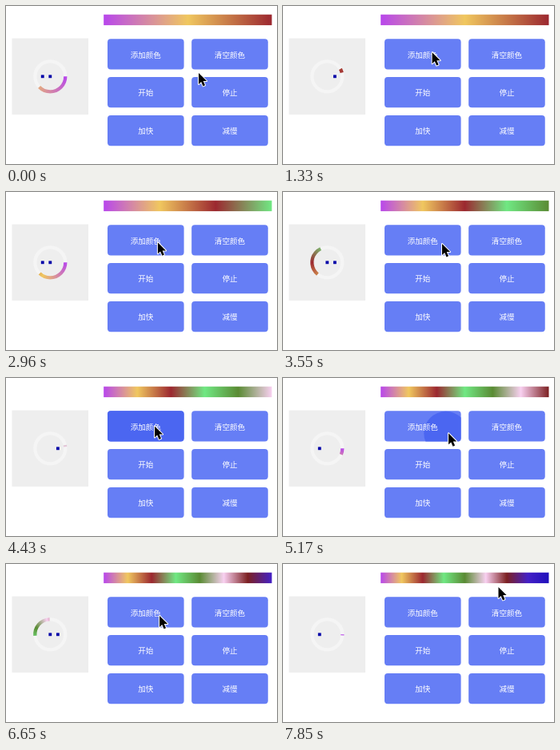
Animation, 339 px wide and 198 px high, one loop 8000 ms. Source, as an HTML page with a canvas:

```html
<!DOCTYPE html>
<html lang="zh">
<head>
<meta charset="utf-8">
<title>颜色加载器</title>
<style>
  html, body { margin: 0; width: 100%; height: 100%; overflow: hidden; background: #fff; }
  canvas { display: block; width: 339px; height: 198px; }
</style>
</head>
<body>
<canvas id="stage"></canvas>
<script>
const W = 339, H = 198, LOOP = 8000;
const STEP = 148.1, LAST_STEP = 53;
const SPIN = 2975, SPIN_OFFSET = 1255;
const UNIT = 0.478; // layout pixels to stage pixels
const PANEL = { x: 7.5, y: 40.5, size: 200 * UNIT };
const CENTER = { x: PANEL.x + PANEL.size / 2, y: PANEL.y + PANEL.size / 2 };
const RING = { r: 19, width: 4.3 };
const DOT = { size: 8 * UNIT, gap: 20 * UNIT };
const BAR = { x: 122.2, y: 10.7, w: 440 * UNIT, h: 28 * UNIT };
const BUTTON = { x: 127, y: 41.3, w: 200 * UNIT, h: 80 * UNIT, margin: 20 * UNIT, r: 4 };
const RIPPLE = { speed: 0.205, life: 400, fade: 50 };
const CLICK = { first: 2200, gap: 950, count: 6 };

const COLORS = ['#b847ec', '#f0c75f', '#9c2830', '#70e883', '#5a8b34',
                '#f8d0f0', '#7c2022', '#4420c6', '#2010bc'];
const LABELS = ['添加颜色', '清空颜色', '开始', '停止', '加快', '减慢'];

// Turning points of the pointer: time, x, y
const TURNS = [
  [0, 241, 84], [1150, 187, 58], [2360, 180.5, 61.5],
  [3550, 199, 65], [4430, 186, 60.5], [5610, 216, 73],
  [6650, 192, 65], [7500, 250, 6], [7850, 269.5, 29]
];
const ARROW = new Path2D('M0 0v14l3.2-2.9 2.3 5.3 2.5-1.1-2.3-5.2h4.4z');

const canvas = document.getElementById('stage');
const scale = window.devicePixelRatio || 1;
canvas.width = W * scale;
canvas.height = H * scale;
const ctx = canvas.getContext('2d');

function pointerAt(t) {
  const next = TURNS.findIndex(turn => turn[0] > t);
  if (next < 0) return TURNS[TURNS.length - 1].slice(1);
  const [t0, x0, y0] = TURNS[next - 1];
  const [t1, x1, y1] = TURNS[next];
  const p = (t - t0) / (t1 - t0);
  const e = p * p * (3 - 2 * p);
  return [x0 + (x1 - x0) * e, y0 + (y1 - y0) * e];
}

function clicksBy(t) {
  const n = Math.floor((t - CLICK.first) / CLICK.gap) + 1;
  return Math.max(0, Math.min(CLICK.count, n));
}

function addStops(gradient, colors) {
  colors.forEach((c, i) => gradient.addColorStop(i / (colors.length - 1), c));
  return gradient;
}

function drawBar(colors) {
  ctx.fillStyle = addStops(ctx.createLinearGradient(BAR.x, 0, BAR.x + BAR.w, 0), colors);
  ctx.fillRect(BAR.x, BAR.y, BAR.w, BAR.h);
}

function strokeArc(from, to, style) {
  ctx.beginPath();
  ctx.arc(CENTER.x, CENTER.y, RING.r, from, to);
  ctx.strokeStyle = style;
  ctx.lineWidth = RING.width;
  ctx.stroke();
}

function drawLoader(t, colors) {
  ctx.fillStyle = '#eee';
  ctx.fillRect(PANEL.x, PANEL.y, PANEL.size, PANEL.size);
  strokeArc(0, Math.PI * 2, '#f5f5f5');

  // The tail starts halfway and catches the head at a full turn
  const phase = (t + SPIN_OFFSET) % SPIN / SPIN;
  const head = Math.PI * (1 - Math.cos(Math.PI * phase));
  const tail = Math.max(0, 2 * head - Math.PI * 2);
  strokeArc(tail, head, addStops(ctx.createConicGradient(0, CENTER.x, CENTER.y), colors));

  // A window two dots wide slides across the three dots
  const slide = Math.floor(phase * 4);
  ctx.fillStyle = '#0000a8';
  for (let i = 0; i < 3; i++) {
    if (i !== slide && i !== slide - 1) continue;
    const x = CENTER.x + (i - 1) * DOT.gap - DOT.size / 2;
    ctx.fillRect(x, CENTER.y - DOT.size / 2, DOT.size, DOT.size);
  }
}

function drawRipple(t) {
  const clicks = clicksBy(t);
  if (!clicks) return;
  const click = CLICK.first + (clicks - 1) * CLICK.gap;
  const age = t - click;
  if (age > RIPPLE.life) return;
  const [x, y] = pointerAt(click);
  ctx.globalAlpha = Math.min(1, (RIPPLE.life - age) / RIPPLE.fade);
  ctx.fillStyle = '#4b66f1';
  ctx.beginPath();
  ctx.arc(x + 1.5, y + 2, age * RIPPLE.speed, 0, Math.PI * 2);
  ctx.fill();
}

function drawButton(label, i, t) {
  const x = BUTTON.x + i % 2 * (BUTTON.w + BUTTON.margin);
  const y = BUTTON.y + Math.floor(i / 2) * (BUTTON.h + BUTTON.margin);
  ctx.save();
  ctx.beginPath();
  ctx.roundRect(x, y, BUTTON.w, BUTTON.h, BUTTON.r);
  ctx.fillStyle = '#667ef5';
  ctx.fill();
  if (i === 0) {
    ctx.clip();
    drawRipple(t);
  }
  ctx.restore();
  ctx.fillStyle = '#fff';
  ctx.font = `${20 * UNIT}px "Noto Sans CJK SC", "Noto Sans CJK", sans-serif`;
  ctx.textAlign = 'center';
  ctx.fillText(label, x + BUTTON.w / 2, y + 23.2);
}

function drawPointer(t) {
  ctx.save();
  ctx.translate(...pointerAt(t));
  ctx.lineJoin = 'round';
  ctx.lineWidth = 2;
  ctx.strokeStyle = '#fff';
  ctx.stroke(ARROW);
  ctx.fillStyle = '#000';
  ctx.fill(ARROW);
  ctx.restore();
}

function draw(now) {
  const t = Math.min(LAST_STEP, Math.floor((now % LOOP + 22) / STEP)) * STEP;
  const colors = COLORS.slice(0, 3 + clicksBy(t));
  ctx.setTransform(scale, 0, 0, scale, 0, 0);
  ctx.fillStyle = '#fff';
  ctx.fillRect(0, 0, W, H);
  drawBar(colors);
  drawLoader(t, colors);
  LABELS.forEach((label, i) => drawButton(label, i, t));
  drawPointer(t);
}

const start = performance.now();
function tick() {
  draw(performance.now() - start);
  requestAnimationFrame(tick);
}
tick();
</script>
</body>
</html>
```
